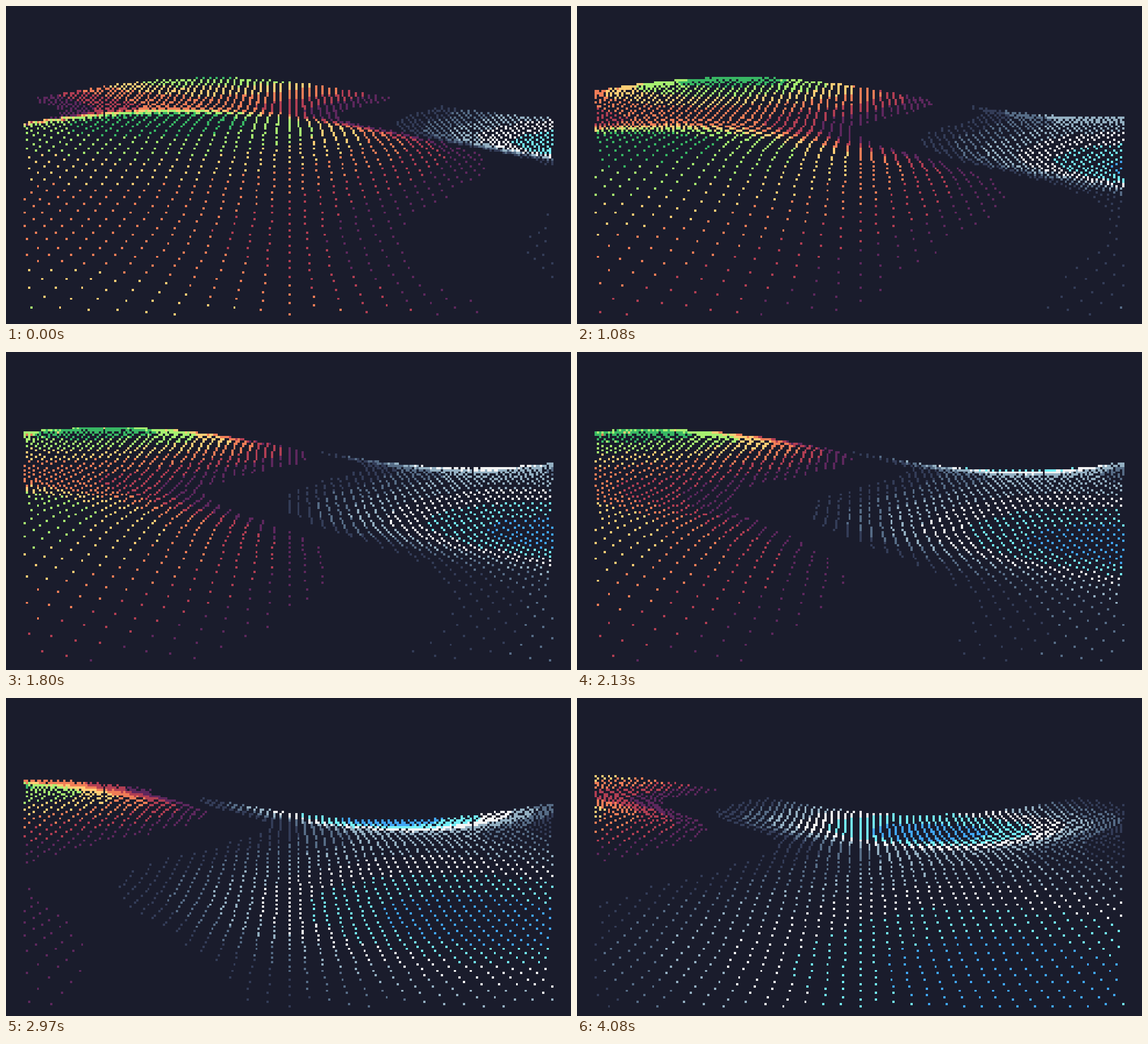
An HTML page with a canvas for the animation above (4.11 s loop, 998x561 px).

```html
<!DOCTYPE html>
<html lang="en">
<head>
<meta charset="utf-8">
<title>Dot waves</title>
<style>
  html, body { margin: 0; width: 100%; height: 100%; overflow: hidden; background: #1a1c2c; }
  canvas { display: block; width: 998px; height: 561px; }
</style>
</head>
<body>
<canvas id="stage" width="998" height="561"></canvas>
<script>
const ctx = document.getElementById('stage').getContext('2d');
const LOOP = 4110, STEP = 30;
const W = 240, H = 136, LEFT = 8, TOP = 4;   // low-resolution screen and its border
const SCALE = 998 / 256;
const FOCAL = 250, FAR = 83, NEAR = 16, EYE = 13.25, LIFT = 0.6;

const BACK = '#1a1c2c';
const WARM = ['#5d275d', '#b13e53', '#ef7d57', '#ffcd75', '#a7f070', '#38b764'];
const COOL = ['#333c57', '#566c86', '#94b0c2', '#f4f4f4', '#73eff7', '#41a6f6'];

const edge = v => Math.round(v * SCALE);

function dot(x, y, color) {
  if (x < 0 || y < 0 || x >= W || y >= H) return;
  const l = edge(x + LEFT), t = edge(y + TOP);
  ctx.fillStyle = color;
  ctx.fillRect(l, t, edge(x + LEFT + 1) - l, edge(y + TOP + 1) - t);
}

function draw(t) {
  ctx.fillStyle = BACK;
  ctx.fillRect(0, 0, 998, 561);
  const sway = -0.8 - 16.6 * Math.sin(0.68 * (t - 1.95));
  const valley = 68.7 - 8.2 * t;

  for (let row = FAR; row >= NEAR; row--) {
    const z = row + 1 / 3;
    const s = FOCAL / z;
    const swell = -1.55 * Math.cos(0.16 * (z - valley));
    const reach = Math.ceil(W / 2 / s);
    for (let col = -reach; col <= reach; col++) {
      const h = 5 * Math.sin(0.059 * (sway - col)) + swell;
      const level = Math.trunc(h);
      if (!level) continue;
      const color = level > 0 ? WARM[level - 1] : COOL[-level - 1];
      dot(Math.floor(W / 2 + col * s), Math.floor(s * (EYE - LIFT * h)), color);
    }
  }
}

const start = performance.now();
let shown = -1;
function tick() {
  const step = Math.floor(((performance.now() - start) % LOOP) / STEP);
  if (step !== shown) draw((shown = step) * STEP / 1000);
  requestAnimationFrame(tick);
}
tick();
</script>
</body>
</html>
```
